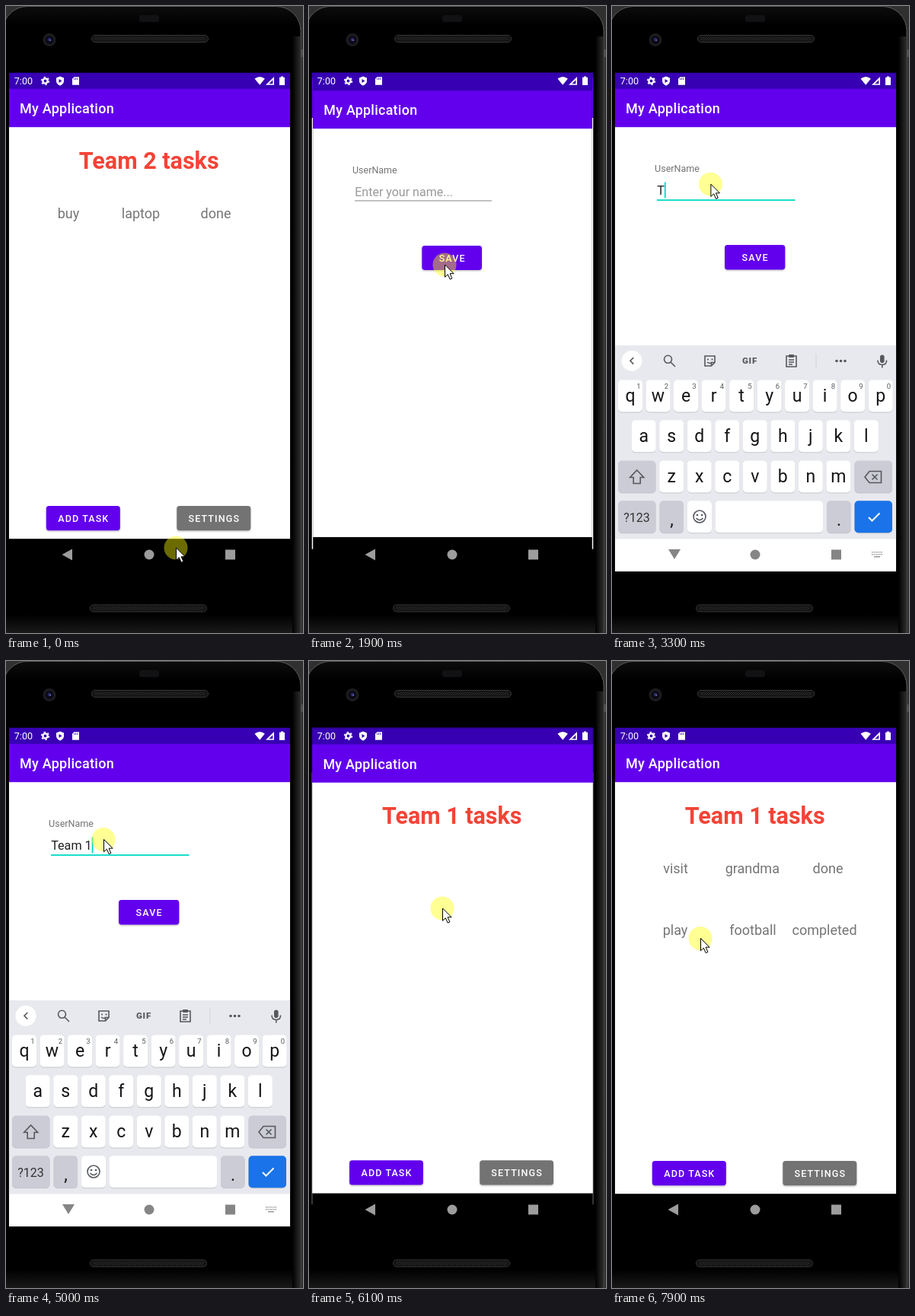
Write an HTML page that moves like this. It is 390 px wide and 824 px high and loops after 8 s.

```html
<!DOCTYPE html>
<html lang="en">
<head>
<meta charset="utf-8">
<title>Team tasks</title>
<style>
html, body { margin: 0; width: 100%; height: 100%; overflow: hidden; background: #000; }
svg { display: block; width: 390px; height: 824px; font-family: Roboto, sans-serif; }
.mid { text-anchor: middle; }
.bar { font-size: 18px; font-weight: 500; letter-spacing: .28px; fill: #fff; }
.title { font-size: 30.5px; font-weight: 700; fill: #f44336; }
.row { font-size: 18px; fill: #757575; }
.btn { font-size: 12.57px; font-weight: 500; letter-spacing: 1.12px; fill: #fff; }
.field { font-size: 16.16px; }
.key { font-size: 23px; fill: #151517; }
.line { fill: none; stroke: #55585d; stroke-width: 1.6; }
</style>
</head>
<body>
<svg id="stage" viewBox="0 0 390 824"></svg>
<script>
const LOOP = 8000;
const OPEN_SETTINGS = 1650, OPEN_TASKS = 5800, OPEN_TIME = 400;
const FOCUS = 2400, KEYS_UP = 2450, KEYS_DOWN = 5820, LIST_SHOWN = 6350;
const TYPED = 'Team 1', TYPE_TIMES = [3200, 3500, 3800, 4000, 4300, 4600];
// time, x, y
const PATH = [
  [250, 223, 712], [950, 321, 682], [1250, 321, 682], [1880, 178, 340],
  [1950, 178, 340], [2350, 130, 234], [4900, 128, 234.5], [5100, 128, 234.5],
  [5650, 175, 325], [6800, 175, 325], [7700, 116, 364.5]
];

const rect = (x, y, w, h, fill, r = 0, extra = '') =>
  `<rect x="${x}" y="${y}" width="${w}" height="${h}" rx="${r}" fill="${fill}" ${extra}/>`;
const circle = (x, y, r, fill, extra = '') =>
  `<circle cx="${x}" cy="${y}" r="${r}" fill="${fill}" ${extra}/>`;
const path = (d, fill, extra = '') => `<path d="${d}" fill="${fill}" ${extra}/>`;
const line = d => `<path class="line" d="${d}"/>`;
const text = (s, x, y, cls, extra = '') => `<text x="${x}" y="${y}" class="${cls}" ${extra}>${s}</text>`;

const button = (label, x, y, w, fill) =>
  rect(x, y + 1.3, w, 32.3, '#000', 3.6, 'opacity=".25" filter="url(#soft)"') +
  rect(x, y, w, 32.3, fill, 3.6) +
  text(label, x + w / 2 + .5, y + 20.9, 'btn mid');

const page = (id, body) => `<g id="${id}">` +
  rect(3.8, 87.5, 369.4, 656, '#000') + rect(3.8, 87.5, 369.4, 22, '#3700b3') +
  rect(3.8, 108.9, 369.4, 51, '#6200ee') + rect(3.8, 159.2, 369.4, 541, '#fff') +
  text('My Application', 18, 141, 'bar') + body + '</g>';

const row = (y, ...cells) => cells.map(([s, x]) => text(s, x, y, 'row mid')).join('');

const tasksPage = (id, title, rows) => page(id,
  text(title, 187.7, 213.7, 'title mid') + `<g id="${id}List">${rows}</g>` +
  button('ADD TASK', 52.8, 656.9, 97, '#6200ee') +
  button('SETTINGS', 224.3, 656.9, 97, '#737373'));

const settingsPage = () => page('settings',
  text('UserName', 56, 218.3, '', 'font-size="12.57" fill="#757575"') +
  '<text id="field" class="field" x="59.2" y="248.3"></text>' +
  '<rect id="underline" x="59" width="181.5"/>' +
  rect(0, 231.5, 1.8, 21, '#03dac5', 0, 'id="caret"') +
  button('SAVE', 148, 314.1, 79.3, '#6200ee'));

function phone() {
  const speaker = (x, y) => rect(x, y, 153, 9, '#111', 4.5, 'stroke="#383838"') +
    rect(x + 3, y + 2, 147, 5, 'url(#mesh)', 2.5);
  return rect(0, 0, 390, 824, '#303030') +
    rect(385, 57, 5, 10, '#4c4c4c') +
    rect(-4, .5, 391, 850, 'url(#body)', 32, 'stroke="#5a5a5a"') +
    rect(376, 40, 10.5, 784, 'url(#edge)') +
    rect(175, 12, 26, 9, '#121215', 3) +
    speaker(112.5, 38.5) + speaker(110.5, 787) +
    circle(57, 44.5, 8.5, '#1d1d20') + circle(57, 44.5, 5.5, '#0b0b16') +
    circle(57, 44, 2.2, '#2a2866') + circle(58.2, 45, .9, '#7773bd');
}

function statusIcons() {
  return text('7:00', 10.8, 103.4, '', 'font-size="12.57" fill="#fff"') +
    circle(51.5, 98.5, 3.1, 'none', 'stroke="#fff" stroke-width="2.4"') +
    circle(51.5, 98.5, 4.9, 'none', 'stroke="#fff" stroke-width="1.6" stroke-dasharray="2.4 2.73"') +
    path('M71 92.5l5 2v4q0 4-5 6.3q-5-2.3-5-6.3v-4z', '#fff') + path('M69.5 96v5l4-2.5z', '#3700b3') +
    path('M89.5 93.2h6.5v10.6h-9v-8z', '#fff') +
    path('M89.6 95v2M91.5 94.5v2.5M93.6 94.5v2.5', 'none', 'stroke="#3700b3" stroke-width=".8"') +
    path('M326.5 95.5q6.7-5 13.4 0l-6.7 8.3z', '#fff') +
    path('M352 93v10.8h-11z', '#fff') + path('M350.3 97.2v5h-5z', '#3700b3') +
    path('M359 93.8h2v-1.4h3v1.4h2v10.2h-7z', '#fff');
}

const navIcons = () => path('M73.5 721l13.5-7.5v15z', '#9c9c9c') +
  circle(188, 721, 6.5, '#9c9c9c') + rect(288, 714.5, 13, 13, '#9c9c9c');

function keyboard() {
  const key = (x, y, w, fill = '#fff') => rect(x, y + 1, w, 42, '#c3c5cc', 5) + rect(x, y, w, 42, fill, 5);
  const gray = '#cbccd5', ink = '#55585d';
  let s = rect(3.8, 446, 369.4, 255, '#e8e9ee') + rect(3.8, 700.5, 369.4, 43, '#fff');
  [['qwertyuiop', 24, 491.5], ['asdfghjkl', 41.7, 544.3], ['zxcvbnm', 78.2, 597.5]].forEach(([row, x0, y], r) =>
    [...row].forEach((c, i) => {
      const x = x0 + i * 36.52;
      s += key(x - 16, y, 32) + text(c, x, y + 28.5, 'key mid');
      if (!r) s += text((i + 1) % 10, x + 10.8, y + 11, 'mid', 'font-size="9.5" fill="#55585d"');
    }));
  s += key(8, 597.5, 49.5, gray) + key(318.5, 597.5, 49.5, gray) +
    key(8, 650.3, 49.5, gray) + key(62.5, 650.3, 31.5, gray) + key(99, 650.3, 32) +
    key(135.5, 650.3, 141.5) + key(282, 650.3, 31.5, gray) + key(318.5, 650.3, 49.5, '#1a73e8') +
    text('?123', 32.5, 677.5, 'mid', 'font-size="16" fill="#333"') +
    text(',', 78.5, 683, 'key mid') + text('.', 298, 683, 'key mid') +
    line('M32.7 610l9 9.5h-4.5v8h-9v-8h-4.5z') +
    line('M338 611.5h15.5v15h-15.5l-6-7.5zM341.5 615.5l7 7m0-7l-7 7') +
    path('M337 672l4.5 4.5l10-10', 'none', 'stroke="#fff" stroke-width="2"') +
    circle(115, 671, 8, 'none', 'class="line"') + circle(112, 669, 1.3, ink) + circle(118, 669, 1.3, ink) +
    line('M110.5 673q4.5 5 9 0');
  // toolbar
  s += circle(26, 466.3, 13.5, '#fff') + line('M28.3 462l-4.3 4.3l4.3 4.3') +
    circle(73.5, 464.3, 5, 'none', 'class="line"') + line('M77 468l6 6') +
    line('M122 460h13v8.5l-4.5 4.5h-8.5zM135 468.5h-4.5v4.5M125 468q3.5 3 6 0') +
    circle(126, 464.5, 1.1, ink) + circle(131.5, 464.5, 1.1, ink) +
    text('GIF', 181, 470.3, 'mid', `font-size="11.5" font-weight="900" letter-spacing=".8" fill="${ink}"`) +
    line('M229 460h13v14h-13zM232 465h7M232 468h7M232 471h5') + rect(232, 458, 7, 4, ink, 1) +
    rect(267.5, 457, 1, 20, '#d2d4d9') +
    [295, 300.5, 306].map(x => circle(x, 466.5, 1.8, ink)).join('') +
    rect(352, 458.5, 5.6, 10.5, ink, 2.8) + line('M349 465.5q0 6 5.8 6t5.8-6M354.8 471.5v4');
  // navigation strip
  s += path('M74 714h16l-8 13z', '#858585') + circle(188, 721, 6.5, '#858585') +
    rect(288, 714.5, 13, 13, '#858585');
  for (let i = 0; i < 12; i++) s += rect(341 + i % 6 * 2.5, 717 + (i / 6 | 0) * 3, 1.5, 1.5, '#999');
  return s + rect(344, 723, 8, 1.5, '#999');
}

const stage = document.getElementById('stage');
stage.innerHTML = `<defs>
  <linearGradient id="body" x1="0" y1="0" x2="0" y2="1">
    <stop offset="0" stop-color="#0c0c0c"/><stop offset=".03" stop-color="#000"/>
    <stop offset=".94" stop-color="#000"/><stop offset=".972" stop-color="#1c1c1c"/>
  </linearGradient>
  <linearGradient id="edge">
    <stop offset="0" stop-color="#000"/><stop offset="1" stop-color="#2c2c2c"/>
  </linearGradient>
  <pattern id="mesh" width="3" height="3" patternUnits="userSpaceOnUse">
    <path d="M0 3L3 0" stroke="#3c3c3c" stroke-width=".8"/>
  </pattern>
  <filter id="soft" x="-10%" y="-20%" width="120%" height="150%"><feGaussianBlur stdDeviation="1"/></filter>
  <clipPath id="screen"><rect x="3.8" y="87.5" width="369.4" height="655.8"/></clipPath>
  </defs>` + phone() + '<g clip-path="url(#screen)">' +
  tasksPage('before', 'Team 2 tasks', row(279, ['buy', 82], ['laptop', 177], ['done', 275.5])) +
  settingsPage() +
  tasksPage('after', 'Team 1 tasks',
    row(279, ['visit', 83.5], ['grandma', 184.3], ['done', 283.5]) +
    row(359.5, ['play', 83], ['football', 185], ['completed', 279])) +
  statusIcons() + navIcons() + `<g id="keys">${keyboard()}</g></g>` +
  '<g id="pointer">' + circle(0, 0, 15.5, '#ff0', 'opacity=".42"') +
  path('M.5 0v16.3l3.8-3.6l2.9 6.5l2.7-1.2l-2.8-6.3h5z', '#fff', 'stroke="#000"') + '</g>';

const $ = id => document.getElementById(id);
const set = (el, attrs) => { for (const k in attrs) el.setAttribute(k, attrs[k]); };
const clamp = v => Math.min(1, Math.max(0, v));
const easeOut = p => 1 - (1 - p) ** 3;
const smooth = p => p * p * (3 - 2 * p);
const progress = (t, start, length) => clamp((t - start) / length);

function pointerAt(t) {
  const i = PATH.findIndex(p => p[0] > t);
  if (i < 0) return PATH[PATH.length - 1].slice(1);
  if (!i) return PATH[0].slice(1);
  const [t0, x0, y0] = PATH[i - 1], [t1, x1, y1] = PATH[i];
  const p = smooth((t - t0) / (t1 - t0));
  return [x0 + (x1 - x0) * p, y0 + (y1 - y0) * p];
}

// A page grows in from 85 % while the one beneath swells to 105 %.
function placePage(id, t, enter, leave) {
  const p = progress(t, enter, OPEN_TIME), q = progress(t, leave, OPEN_TIME);
  const k = (.85 + .15 * easeOut(p)) * (1 + .05 * easeOut(q));
  set($(id), {
    transform: `translate(188.5 415.5) scale(${k}) translate(-188.5 -415.5)`,
    opacity: progress(t, enter + 50, 50),
    visibility: t < enter || q >= 1 ? 'hidden' : 'visible'
  });
}

function draw(t) {
  placePage('before', t, -OPEN_TIME, OPEN_SETTINGS);
  placePage('settings', t, OPEN_SETTINGS, OPEN_TASKS);
  placePage('after', t, OPEN_TASKS, LOOP);
  set($('afterList'), { opacity: t < LIST_SHOWN ? 0 : 1 });

  const typed = TYPED.slice(0, TYPE_TIMES.filter(k => k <= t).length);
  const focused = t >= FOCUS, field = $('field');
  field.textContent = typed || 'Enter your name...';
  set(field, { fill: typed ? '#1f1f1f' : '#999' });
  set($('underline'), focused
    ? { y: 254.2, height: 1.8, fill: '#03dac5' }
    : { y: 254.2, height: 1, fill: '#858585' });
  set($('caret'), {
    x: 59.2 + (typed ? field.getSubStringLength(0, typed.length) : 0),
    opacity: focused ? 1 : 0
  });

  const shown = easeOut(progress(t, KEYS_UP, 250)) - progress(t, KEYS_DOWN, 220) ** 2;
  set($('keys'), {
    transform: `translate(0 ${297 * (1 - shown)})`,
    visibility: shown > 0 ? 'visible' : 'hidden'
  });
  set($('pointer'), { transform: `translate(${pointerAt(t)})` });
}

const start = performance.now();
function frame() {
  draw((performance.now() - start) % LOOP);
  requestAnimationFrame(frame);
}
frame();
</script>
</body>
</html>
```
